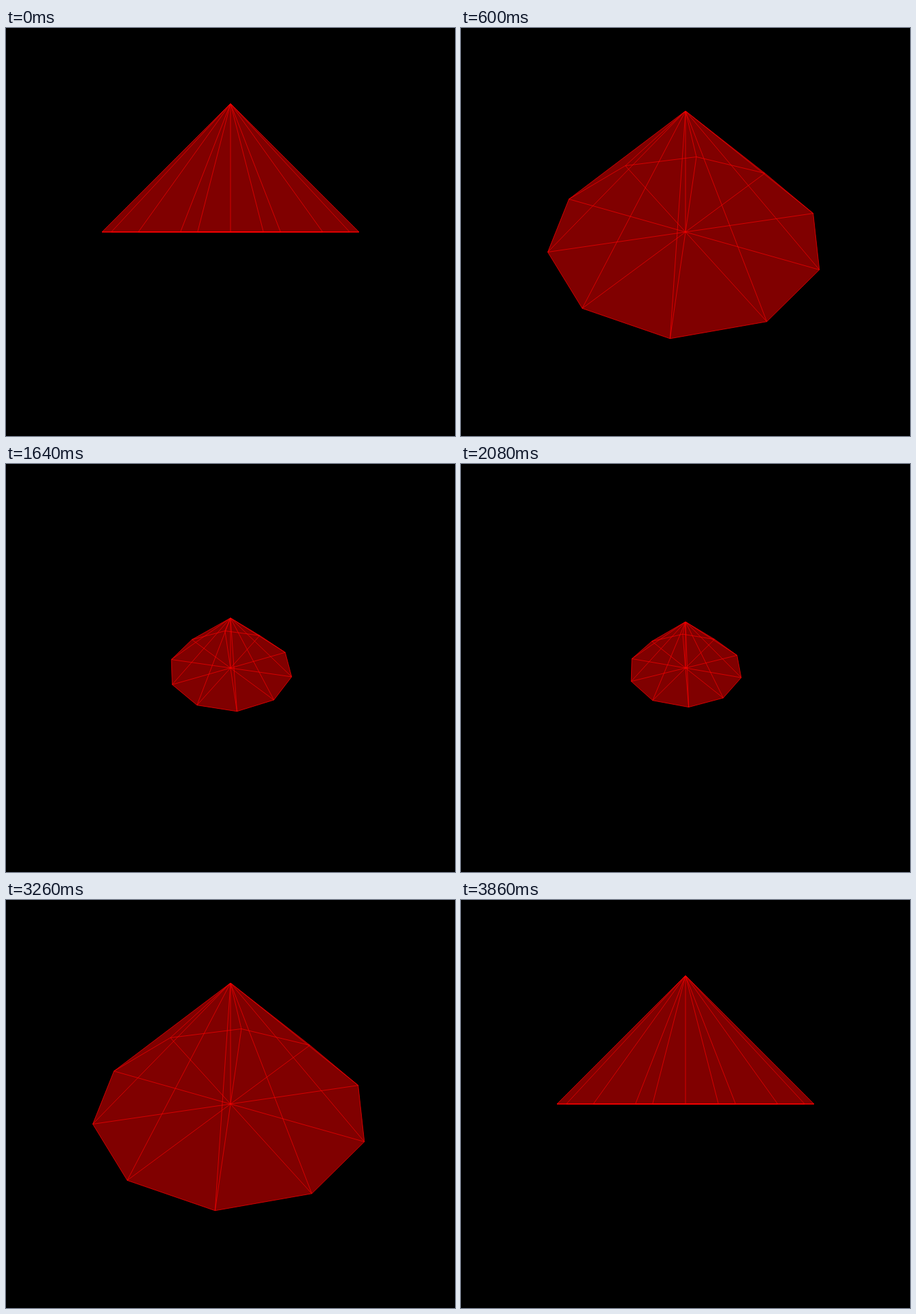
These frames come from a looping animation (660 by 600 pixels, 3880 ms). An HTML page with a canvas:

```html
<!DOCTYPE html>
<html lang="en">
<head>
<meta charset="utf-8">
<title>Cone fly-around</title>
<style>
  html, body { margin: 0; width: 100%; height: 100%; overflow: hidden; background: #000; }
  canvas { display: block; }
</style>
</head>
<body>
<canvas id="stage" width="660" height="600"></canvas>
<script>
const ctx = document.getElementById('stage').getContext('2d');
const STEP = 20, STEPS = 194, SIDES = 10, FOCAL = 869;

// Camera path knots: step, x, x speed, height, height speed (depth equals height).
const path = [
  [0, 4.6, -0.063, 0, 0.09],
  [15, 3.42, -0.105, 1.45, 0.099],
  [30, 1.68, -0.118, 2.84, 0.08],
  [62, -1.715, -0.101, 4.995, 0.065],
  [96, -5.04, -0.097, 7.15, 0.063]
];

function hermite(a, b, k, i) {
  const h = b[0] - a[0], s = (k - a[0]) / h, r = 1 - s;
  return a[i] + (b[i] - a[i]) * s * s * (3 - 2 * s)
    + h * s * r * (a[i + 1] * r - b[i + 1] * s);
}

function camera(k) {
  let n = 1;
  while (n < path.length - 1 && k > path[n][0]) n++;
  const x = hermite(path[n - 1], path[n], k, 1);
  const y = hermite(path[n - 1], path[n], k, 3);
  const ground = Math.hypot(x, y), dist = Math.hypot(ground, y);
  return { dist, sin: y / dist, cos: ground / dist, turn: Math.atan2(y, x) };
}

function project(cam, x, y, z) {
  const scale = FOCAL / (cam.dist - z * cam.cos - y * cam.sin);
  return [x * scale, (z * cam.sin - y * cam.cos) * scale];
}

function trace(points) {
  ctx.beginPath();
  points.forEach(p => ctx.lineTo(p[0], p[1]));
}

function line(a, b) {
  trace([a, b]);
  ctx.stroke();
}

function draw(k) {
  const cam = camera(k);
  const apex = project(cam, 0, 1, 0), center = [0, 0];
  const rim = Array.from({ length: SIDES }, (_, i) => {
    const a = Math.PI / 10 + i * 2 * Math.PI / SIDES - cam.turn;
    return project(cam, Math.sin(a), 0, Math.cos(a));
  });
  const next = i => rim[(i + 1) % SIDES];

  ctx.setTransform(1, 0, 0, 1, 0, 0);
  ctx.fillStyle = '#000';
  ctx.fillRect(0, 0, 660, 600);
  ctx.translate(330, 300);

  ctx.fillStyle = '#800000';
  trace(rim);
  ctx.fill();
  rim.forEach((p, i) => {
    trace([apex, p, next(i)]);
    ctx.fill();
  });

  ctx.strokeStyle = 'rgba(255, 0, 0, 0.75)';
  ctx.lineWidth = 0.9;
  rim.forEach((p, i) => {
    line(apex, p);
    line(center, p);
    line(p, next(i));
  });
  line(apex, center);
}

function tick() {
  const step = Math.floor(performance.now() / STEP) % STEPS;
  draw(Math.min(step, STEPS - 1 - step));
  requestAnimationFrame(tick);
}
tick();
</script>
</body>
</html>
```
